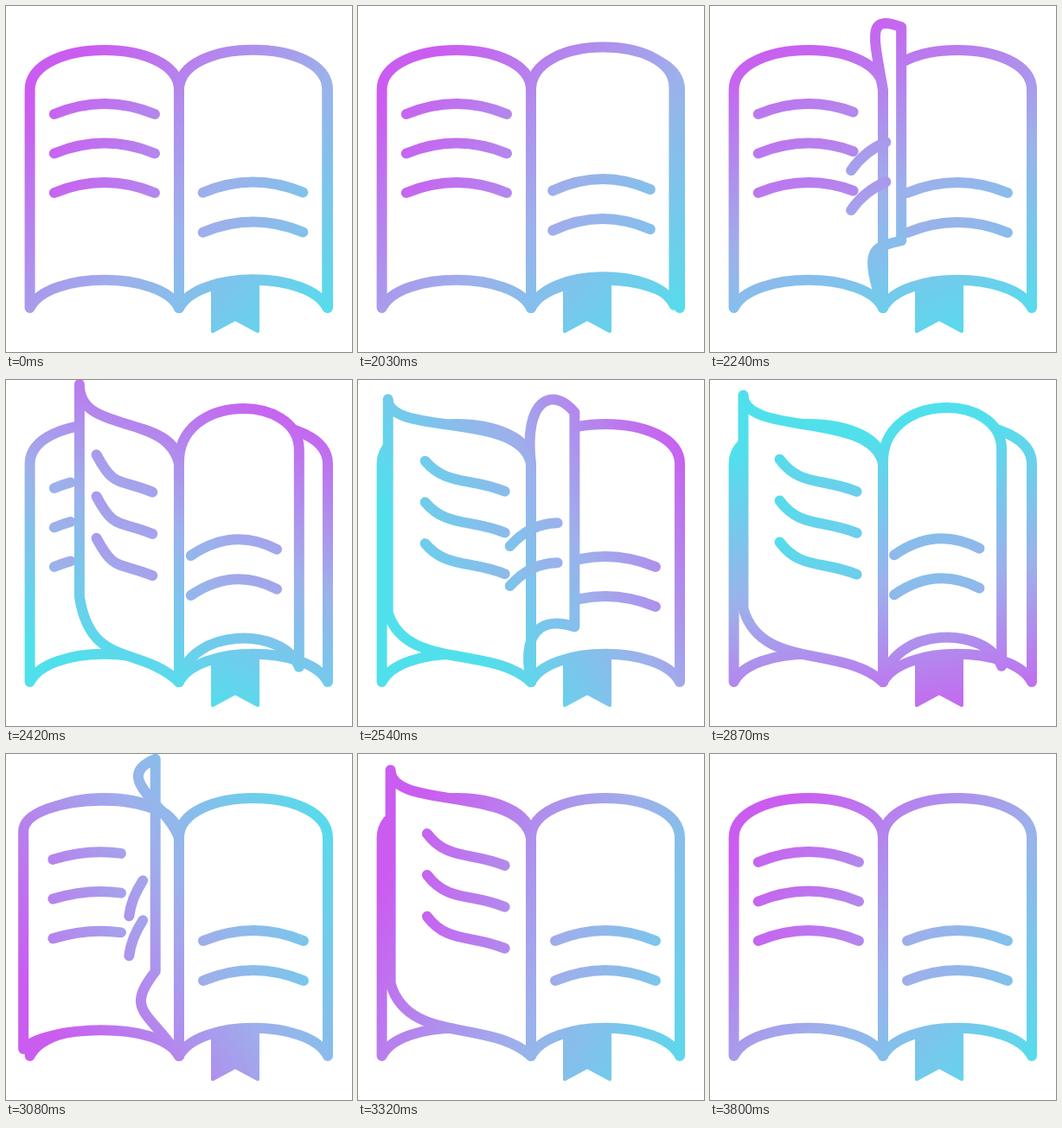
Recreate the animation shown at these times as an HTML page with a canvas. Size 400 by 400 pixels, loop 3.83 s.

```html
<!DOCTYPE html>
<html>
<head>
<meta charset="utf-8">
<style>
html, body { margin: 0; width: 100%; height: 100%; overflow: hidden; background: #fff; }
canvas { display: block; }
</style>
</head>
<body>
<canvas id="stage" width="400" height="400"></canvas>
<script>
const ctx = document.getElementById('stage').getContext('2d');
const LOOP = 3830, HOLD = 2000, STEP = 30;
const SETTLED = 28;   // steps one page needs to turn

// A page s steps into its turn: its edge swings round and it lifts, bows and curls.
function pageAt(s) {
  const swing = Math.cos(0.18 * s - 0.002 * s * s);   // 1 right, -1 left
  const lift = Math.min(92, 105 * Math.sin(Math.PI * s / SETTLED) ** 2);
  const bow = Math.min(30, 1.3 * lift);
  const curl = 0.6 * lift * Math.max(0, Math.cos(2.5 * swing));
  return { s, x: 195 + 177 * swing, swing, lift, bow, curl };
}

function outline({ x, swing, lift, bow, curl }) {
  const bend = bow * Math.tanh(4 * swing + 0.8), arch = Math.max(0, bend);
  ctx.beginPath();
  ctx.moveTo(200, 97);
  ctx.bezierCurveTo(200 - 0.15 * lift, 35.7 + 0.6 * curl - arch,
    x - curl, 35.7 - bend, x, 97 - lift);
  ctx.lineTo(x, 349 - 1.07 * lift);
  ctx.bezierCurveTo(x - 22 * swing - 0.75 * curl, 306 - bend,
    200 + 22 * swing - 0.35 * lift, 306 - arch, 200, 349);
  ctx.closePath();
  ctx.fillStyle = '#fff';
  ctx.fill();
  ctx.stroke();
}

function rows(count, pitch, x, y, curve) {
  for (let i = 0; i < count; i++) {
    ctx.save();
    ctx.translate(0, i * pitch);
    ctx.beginPath();
    ctx.moveTo(x, y);
    curve();
    ctx.stroke();
    ctx.restore();
  }
}

function frontLines({ x, swing, lift, bow }) {
  const x0 = 228 - 0.43 * (372 - x), y0 = 216 - 0.15 * lift - 0.5 * bow;
  const x1 = x - 16 - 12 * swing, y1 = 216 - 0.6 * lift - 0.5 * bow;
  const rise = (24 + 0.6 * bow) * Math.max(0, swing);
  rows(2, 46, x0, y0, () => ctx.quadraticCurveTo(
    (x0 + x1) / 2 - 0.06 * lift, (y0 + y1) / 2 - rise, x1, y1));
}

// Lines on the left shrink ahead of the pages that come down on them.
function backLines({ x, lift }, above) {
  const shown = Math.min(1, ...above.map(p => (p.x - 56) / 176));
  if (shown <= 0) return;
  if (shown < 1) ctx.setLineDash([shown * 120, 999]);
  const x0 = 56 + 0.25 * lift + 0.45 * (x - 28), y0 = 125 - 0.42 * lift;
  const x1 = 172 - 0.03 * lift, y1 = 125 + 0.05 * lift;
  rows(3, 45.5 + 0.03 * lift, x0, y0, () => ctx.bezierCurveTo(
    x0 + 39 - 0.2 * lift, y0 - 16 + 0.6 * lift, x1 - 39, y1 - 16, x1, y1));
  ctx.setLineDash([]);
}

function bookmark() {
  ctx.beginPath();
  [[239, 318], [291, 318], [291, 376], [265, 362], [239, 376]]
    .forEach(p => ctx.lineTo(...p));
  ctx.closePath();
  ctx.lineWidth = 4;
  ctx.fill();
  ctx.stroke();
}

// The colours make one eased turn, drifting and changing length on the way.
function gradient(k) {
  const u = Math.min(1, k / 51);
  const turn = 2 * Math.PI * u * u * (3 - 2 * u);
  const drift = Math.cos(turn + Math.PI / 6);
  const length = 380 + 60 * drift, mid = 0.45 + 0.15 * drift;
  const at = d => [200 + d * Math.cos(turn - 0.75 * Math.PI), 200 + d * Math.sin(turn - 0.75 * Math.PI)];
  const g = ctx.createLinearGradient(...at(length * (1 - mid)), ...at(-length * mid));
  ['#cb5cf0', '#9db0eb', '#50e0ec'].forEach((c, i) => g.addColorStop(i / 2, c));
  return g;
}

function draw(k) {
  const pages = [(k + 0.5) * 1.03, k - 10.4, k - 25.3]
    .filter(s => s >= 0 && s < SETTLED).map(pageAt);
  const right = pageAt(0), left = pageAt(SETTLED);

  ctx.fillStyle = '#fff';
  ctx.fillRect(0, 0, 400, 400);
  ctx.strokeStyle = ctx.fillStyle = gradient(k);
  ctx.lineCap = ctx.lineJoin = 'round';
  bookmark();
  ctx.lineWidth = 12;
  outline(left);
  outline(right);
  backLines(left, pages);
  if (!pages.some(p => p.s < 5)) frontLines(right);

  const drawPage = p => {
    outline(p);
    if (p.s < 13) frontLines(p);
    else backLines(p, pages.filter(q => q.s < p.s));
  };
  pages.filter(p => p.x > 300).reverse().forEach(drawPage);
  pages.filter(p => p.x <= 300).forEach(drawPage);
}

function tick() {
  const t = performance.now() % LOOP;
  draw(Math.max(0, Math.floor((t - HOLD) / STEP)));
  requestAnimationFrame(tick);
}
tick();
</script>
</body>
</html>
```
